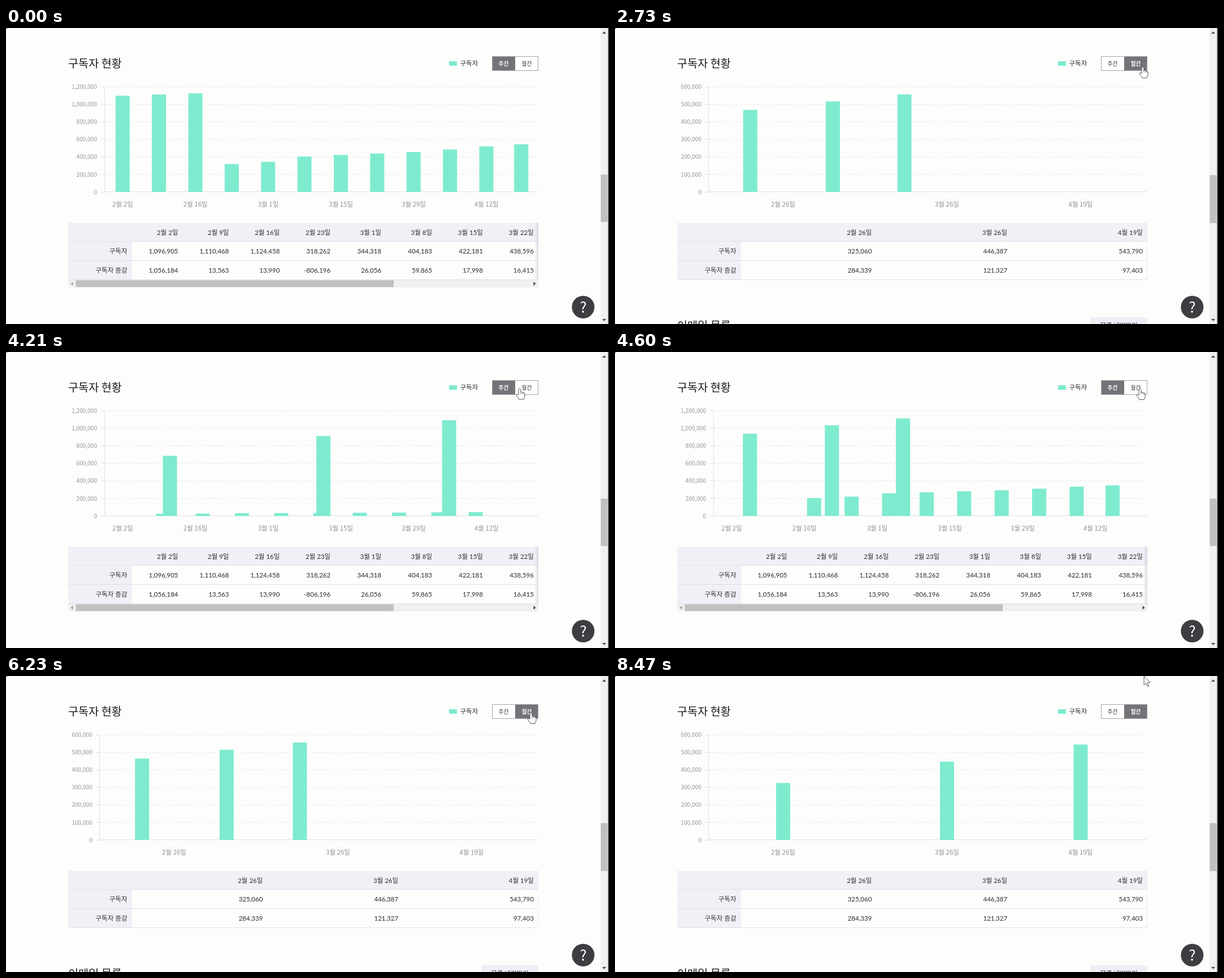
Animation, 1067 px wide and 525 px high, one loop 8570 ms. Source, as an HTML page with a canvas:

```html
<!DOCTYPE html>
<html lang="ko">
<head>
<meta charset="utf-8">
<style>
html, body { margin: 0; width: 100%; height: 100%; overflow: hidden; background: #fdfdfc; }
canvas { display: block; width: 1067px; height: 525px; }
</style>
</head>
<body>
<canvas id="stage"></canvas>
<script>
const W = 1067, H = 525, LOOP = 8570, MORPH = 1394;
const TOP = 104, BASE = 291, BAR_W = 25;
const canvas = document.getElementById('stage');
const ctx = canvas.getContext('2d');
const dpr = window.devicePixelRatio || 1;
canvas.width = W * dpr;
canvas.height = H * dpr;

const CJK = '"Noto Sans CJK KR", "Noto Sans KR", "Noto Sans CJK", sans-serif';
const MIXED = 'Lato, ' + CJK;
const INK = '#2b2b2f', MUTED = '#939396', MINT = '#7eebcf', PALE = '#f0f1f7';

const week = {
  max: 1200000, axis: 174, labelX: 161,
  values: [1096905, 1110468, 1124458, 318262, 344318, 404183, 422181, 438596, 456000, 484500, 520000, 543790],
  xs: Array.from({ length: 12 }, (_, i) => i < 11 ? 206.3 + 64.37 * i : 911.7),
  ticks: ['2월 2일', '2월 16일', '3월 1일', '3월 15일', '3월 29일', '4월 12일'],
  tickX: i => 206.5 + 128.74 * i,
  heads: ['2월 2일', '2월 9일', '2월 16일', '2월 23일', '3월 1일', '3월 8일', '3월 15일', '3월 22일'],
  diffs: [1056184, 13563, 13990, -806196, 26056, 59865, 17998, 16415],
  colX: i => 304.5 + 89.9 * i
};
const month = {
  max: 600000, axis: 165, labelX: 153,
  values: [325060, 446387, 543790],
  xs: [297.5, 587.5, 824],
  ticks: ['2월 26일', '3월 26일', '4월 19일'],
  tickX: i => month.xs[i],
  heads: ['2월 26일', '3월 26일', '4월 19일'],
  diffs: [284339, 121327, 97403],
  colX: i => 454.3 + 239.8 * i
};

// Each view starts at its click time.
const views = [
  { at: -MORPH, view: week },
  { at: 2105, view: month },
  { at: 3830, view: week },
  { at: 5596, view: month }
];

// Pointer tip: time, x, y
const path = [
  [1100, 938, -24], [1900, 934, 69], [3400, 934, 69], [3700, 883, 64], [3950, 883, 64],
  [4450, 929, 65], [6400, 929, 65], [6950, 936, 0], [LOOP, 936, 0]
];

const ease = t => t < 0.5 ? 4 * t ** 3 : 1 - 4 * (1 - t) ** 3;
const clamp = t => Math.max(0, Math.min(1, t));
const mix = (a, b, p) => a + (b - a) * p;
const num = n => n.toLocaleString('en-US');

function box(x, y, w, h, color) {
  ctx.fillStyle = color;
  ctx.fillRect(x, y, w, h);
}

function text(s, x, y, size, { color = INK, align = 'left', weight = 400, font = CJK } = {}) {
  ctx.font = `${weight} ${size}px ${font}`;
  ctx.textAlign = align;
  ctx.fillStyle = color;
  ctx.fillText(s, x, y + size * 0.37);
}

function line(x1, y1, x2, y2, color, dash = []) {
  ctx.strokeStyle = color;
  ctx.lineWidth = 1;
  ctx.setLineDash(dash);
  ctx.beginPath();
  ctx.moveTo(x1, y1);
  ctx.lineTo(x2, y2);
  ctx.stroke();
  ctx.setLineDash([]);
}

function poly(points, color, stroke) {
  ctx.beginPath();
  points.forEach(([x, y]) => ctx.lineTo(x, y));
  ctx.closePath();
  ctx.fillStyle = color;
  ctx.fill();
  if (stroke) {
    ctx.strokeStyle = stroke;
    ctx.lineWidth = 1;
    ctx.stroke();
  }
}

function header(view) {
  text('구독자 현황', 110, 63, 19.7, { color: '#1c1c1f' });
  box(784, 59, 14, 8, MINT);
  text('구독자', 803.5, 63, 11.5);
  const left = view === week;
  box(860, 50, 82, 26, '#fff');
  box(left ? 860 : 901, 50, 41, 26, '#747478');
  ctx.strokeStyle = '#a3a3b0';
  ctx.lineWidth = 1;
  ctx.strokeRect(860.5, 50.5, 81, 25);
  [['주간', 880.5, left], ['월간', 921.5, !left]].forEach(([s, x, on]) =>
    text(s, x, 63, 9.7, { align: 'center', weight: on ? 700 : 500, color: on ? '#fff' : INK }));
}

function axes(view) {
  for (let i = 0; i <= 6; i++) {
    const y = BASE - i * (BASE - TOP) / 6, py = Math.floor(y) + 0.5;
    if (i) line(view.axis, py, 942, py, '#e4e4f0', [4, 4]);
    line(view.axis - 6, py, view.axis, py, '#e0e0e2');
    text(num(view.max * i / 6), view.labelX, y, 10.1, { color: MUTED, align: 'right' });
  }
  line(view.axis + 0.5, TOP, view.axis + 0.5, BASE, '#e2e2e5');
  line(view.axis, BASE - 0.5, 942, BASE - 0.5, '#dedee0');
  view.ticks.forEach((s, i) => text(s, view.tickX(i), 313, 11.5, { color: MUTED, align: 'center' }));
}

function bars(view, prev, p) {
  view.values.forEach((v, i) => {
    const full = (BASE - TOP) * v / view.max;
    let x0, h0;
    if (i < prev.values.length) {
      x0 = prev.xs[i];
      h0 = (BASE - TOP) * prev.values[i] / prev.max;
    } else {
      // New bars begin at their date on the monthly scale.
      x0 = i < 11 ? 267.5 + 70 * (i - 3) : 824;
      h0 = 0;
    }
    const h = mix(h0, full, p);
    box(mix(x0, view.xs[i], p) - BAR_W / 2, BASE - h, BAR_W, h, MINT);
  });
}

function table(view) {
  const cell = { align: 'right', font: MIXED };
  box(110, 345.5, 832, 33, PALE);
  box(110, 378, 113, 68, PALE);
  [378.5, 412.5, 446.5].forEach(y => line(110, y, 942, y, '#dfdfe6'));
  text('구독자', 214.7, 396, 11.6, cell);
  text('구독자 증감', 214.7, 430, 11.6, cell);
  view.heads.forEach((s, i) => {
    const x = view.colX(i);
    text(s, x, 362.5, 11.5, cell);
    text(num(view.values[i]), x, 396, 11.5, cell);
    text(num(view.diffs[i]), x, 430, 11.5, cell);
  });
  if (view === month) {
    line(941.5, 346, 941.5, 446, '#ededf3');
    return;
  }
  const fade = ctx.createLinearGradient(935, 0, 942, 0);
  fade.addColorStop(0, 'rgba(200,200,212,0)');
  fade.addColorStop(1, 'rgba(200,200,212,.6)');
  box(935, 345.5, 7, 101, fade);
  box(110, 447, 832, 13, '#f0f0f1');
  box(123.5, 447.5, 562.5, 12, '#c0c0c0');
  poly([[118.5, 450], [118.5, 457], [114.5, 453.5]], '#9c9c9c');
  poly([[933.5, 450], [933.5, 457], [937.5, 453.5]], '#444');
}

function nextSection() {
  text('이메일 목록', 110, 528, 19.7, { color: '#1c1c1f' });
  ctx.fillStyle = '#eeeff5';
  ctx.beginPath();
  ctx.roundRect(841, 513, 101, 30, 3);
  ctx.fill();
  text('목록 내려받기', 891.5, 528, 11.5, { align: 'center' });
}

function chrome(view) {
  ctx.fillStyle = '#3d3e41';
  ctx.beginPath();
  ctx.arc(1021.3, 495, 20, 0, Math.PI * 2);
  ctx.fill();
  text('?', 1021.3, 495, 26, { color: '#fff', align: 'center', weight: 500 });

  box(1052, 0, 13.5, H, '#f0f0f0');
  box(1052.5, view === week ? 260 : 261, 12, view === week ? 84 : 85, '#c0c0c0');
  poly([[1055, 10], [1062, 10], [1058.5, 6]], '#4c4c4c');
  poly([[1055, 516], [1062, 516], [1058.5, 520]], '#4c4c4c');
  box(1065.5, 0, 1.5, H, '#2a2a2a');
  box(0, 0, 2, 1, '#333');
}

function hand() {
  ctx.beginPath();
  ctx.moveTo(-2, 11);
  ctx.lineTo(-2, 1.5);
  ctx.quadraticCurveTo(0, -1.2, 1.8, 1.5);
  ctx.lineTo(1.8, 6.5);
  ctx.quadraticCurveTo(4, 5, 5, 7.3);
  ctx.quadraticCurveTo(7, 6, 7.6, 8.3);
  ctx.quadraticCurveTo(9.6, 8, 9.2, 11);
  ctx.quadraticCurveTo(9.4, 15, 7, 19.5);
  ctx.lineTo(-1, 19.5);
  ctx.quadraticCurveTo(-3, 15.5, -6, 12);
  ctx.quadraticCurveTo(-6, 9, -2, 11.5);
  ctx.closePath();
  ctx.fillStyle = '#fff';
  ctx.fill();
  ctx.strokeStyle = '#55555e';
  ctx.lineWidth = 1;
  ctx.stroke();
  [1.8, 4.8, 7.4].forEach(x => line(x, 7, x, 10, '#77777f'));
}

function pointer(t) {
  const i = path.findIndex(k => k[0] > t);
  if (i < 1) return;
  const [t0, x0, y0] = path[i - 1], [t1, x1, y1] = path[i];
  const p = ease((t - t0) / (t1 - t0));
  const x = mix(x0, x1, p), y = mix(y0, y1, p);
  ctx.save();
  ctx.translate(x, y);
  if (x > 860 && x < 942 && y > 50 && y < 76) hand();
  else poly([[0, 0], [0, 16], [3.7, 12.6], [6.2, 18.4], [8.7, 17.3], [6.2, 11.6], [11, 11.4]], '#fff', '#55555e');
  ctx.restore();
}

function draw(t) {
  ctx.setTransform(dpr, 0, 0, dpr, 0, 0);
  box(0, 0, W, H, '#fdfdfc');
  let n = views.length - 1;
  while (views[n].at > t) n--;
  const { at, view } = views[n];
  const prev = n ? views[n - 1].view : view;
  header(view);
  axes(view);
  bars(view, prev, ease(clamp((t - at) / MORPH)));
  table(view);
  if (view === month) nextSection();
  chrome(view);
  pointer(t);
}

const start = performance.now();
function tick() {
  draw((performance.now() - start) % LOOP);
  requestAnimationFrame(tick);
}
tick();
</script>
</body>
</html>
```
